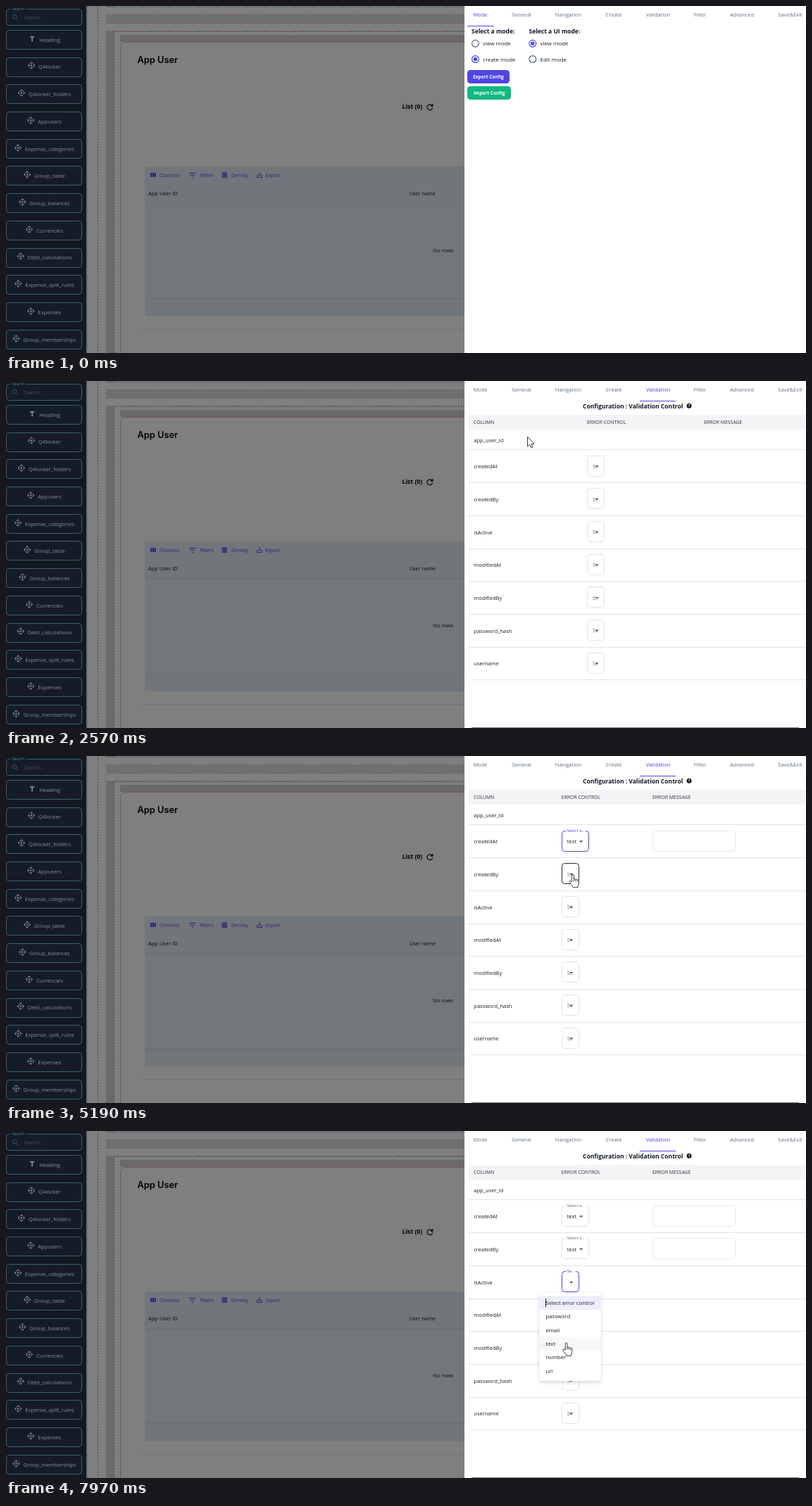
Recreate the animation shown at these times as an HTML page. Size 1136x493 px, loop 8 s.

```html
<!DOCTYPE html>
<html lang="en">
<head>
<meta charset="utf-8">
<title>Validation settings</title>
<style>
html, body { margin: 0; width: 100%; height: 100%; overflow: hidden; background: #fff; }
svg { display: block; width: 100%; height: 100%; font-family: "Open Sans", "Noto Sans", sans-serif; }
text { white-space: pre; }
</style>
</head>
<body>
<svg id="stage" viewBox="0 0 1136 493" xmlns="http://www.w3.org/2000/svg">
  <defs>
    <filter id="soft" x="-20%" y="-20%" width="140%" height="140%">
      <feDropShadow dx="0" dy="2" stdDeviation="2.5" flood-color="#1e293b" flood-opacity=".2"/>
    </filter>
  </defs>
  <g id="back"></g>
  <g id="panel"></g>
  <g id="tabs"></g>
  <rect id="ink" y="28" height="1" fill="#4f46e5"/>
  <g id="menu"></g>
  <g id="pointer" stroke="#222" stroke-width=".9" stroke-linejoin="round" fill="#fff">
    <path id="arrow" d="M.5 .5V14L3.7 11.1 5.9 15.7 8 14.8 6 10.3H10.2Z"/>
    <path id="hand" d="M4.2 10.8V1.9a1.4 1.4 0 0 1 2.8 0V7.2a1.3 1.3 0 0 1 2.4.4 1.3 1.3 0 0 1 2.3.6 1.2 1.2 0 0 1 2.1 1V13c0 2-1.2 3-1.4 5.8H5.8C5.6 16.6 2.4 14.2.8 11.4.1 9.7 1.7 9 2.7 9.8ZM7 7.2V10M9.4 7.8V10M11.7 8.5V10.4"/>
  </g>
</svg>
<script>
const LOOP = 8000, EDGE = 651, VIOLET = "#4f46e5", INK = "#17202d", INDIGO = "#282478";
const $ = id => document.getElementById(id);
const crisp = v => Math.floor(v) + .5;

const text = (x, y, s, size, fill = INK, more = "") =>
  `<text x="${x}" y="${Math.round(y)}" font-size="${size}" fill="${fill}" ${more}>${s}</text>`;
const box = (x, y, w, h, fill, more = "") =>
  `<rect x="${x}" y="${y}" width="${w}" height="${h}" fill="${fill}" ${more}/>`;
const line = (d, stroke, more = "") =>
  `<path d="${d}" fill="none" stroke="${stroke}" ${more}/>`;
const BOLD = 'font-weight="700"', MID = 'text-anchor="middle"';

// ---- dimmed page behind the drawer
function page() {
  const red = "#7c4d45", blue = "#3f4866", dash = 'stroke-dasharray="2 2"';
  const across = (x, y) => `M${x} ${y}H${EDGE}`;
  let s = box(0, 0, EDGE, 493, "#7f7f7f") + box(114, 0, 2, 493, "#6e6e6e");
  s += line("M130.500 0V493", "#444", dash);
  s += box(142, 0, 12, 2, "#6a6a6a") + box(142, 13, EDGE - 142, 11, "#6f6f6f") + box(142, 36, 11, 457, "#6a6a6a");
  s += line(across(154, 1.5), blue, dash) + line(across(142, 12.5) + across(142, 24.5) + across(142, 35.5), red, dash);
  s += line("M153.500 493V36.500" + across(153.5, 36.5), blue, dash);
  s += box(162, 41, EDGE - 162, 10, "#6a6a6a");
  s += line(`M162.500 493V60Q162.500 51.500 171 51.500H${EDGE}`, "#7b5650");
  s += text(186.5, 81, "App User", 12.8, "#000", 'font-family="Inter, sans-serif" font-weight="600"');
  s += text(562.5, 146, "List (0)", 8.7, "#000", BOLD);
  s += line("M605 141.300A3.900 3.900 0 1 0 605.800 144.500", "#000", 'stroke-width="1.200"');
  s += `<path d="M606.500 138.500V142.700H602.300Z"/>`;

  s += box(197, 228, 454, 213, "#70767a", 'rx="3"') + box(197, 281, 454, 134, "#73777a");
  s += line(across(197, 280.5) + across(197, 415.5), "#696d70") + line("M567.500 262V270", "#646a70");
  s += line(across(192, 459.5), "#747474");
  for (const [x, label] of [[218, "Columns"], [275.5, "Filters"], [320, "Density"], [368.5, "Export"]])
    s += text(x, 243, label, 6.85, INDIGO, 'font-weight="500"');
  for (let i = 0; i < 3; i++) s += box(205 + i * 2.8, 237, 2.2, 6, INDIGO);
  s += line("M260 237.500H269.500M262 240.500H267.500M264 243.500H265.800", INDIGO);
  for (let i = 0; i < 4; i++) s += box(306.5, 236.5 + i * 2, 7.5, 1.4, INDIGO);
  s += line("M356.500 240V243.500H363.500V240M360 236V241M358 239.300L360 241.300 362 239.300", INDIGO);
  s += text(202, 269, "App User ID", 7.5, "#0c0c0c") + text(572.5, 269, "User name", 7.35, "#0c0c0c");
  s += text(606, 350, "No rows", 7.6, "#0c0c0c");
  return s;
}

function sidebar() {
  const bg = "#131822", teal = "#35666a", pale = "#898e96";
  const names = ["Heading", "Q4locker", "Q4locker_folders", "Appusers", "Expense_categories", "Group_table",
    "Group_balances", "Currencies", "Debt_calculations", "Expense_split_rules", "Expenses", "Group_memberships"];
  let s = box(0, 0, 114, 493, bg);
  const frame = (y, h) => box(.5, y, 107, h, "#161c27", `rx="4" stroke="${teal}"`);
  s += frame(4.5, 23) + box(6.5, 3, 22, 4, bg) + text(8.5, 6, "Search", 5.7, "#4d9193");
  s += `<circle cx="12.300" cy="15.300" r="2.900" fill="none" stroke="#4a505a"/>` + line("M14.500 17.500L17.500 20.500", "#4a505a");
  s += text(26, 19, "Search...", 7.1, "#4a505a");
  names.forEach((n, i) => {
    const y = 47.8 + i * 38.73;
    s += frame(Math.round(y - 14) + .5, 27) + text(62, y + 2.8, n, 7.65, pale, MID + ' class="item"');
  });
  return s;
}

// Icons sit just left of each centred label.
function icons() {
  let s = "";
  document.querySelectorAll(".item").forEach((el, i) => {
    const x = 62 - el.getComputedTextLength() / 2 - 10, y = +el.getAttribute("y") - 4.5;
    let d = "M-3 -2.600H3M0 -2.600V4";
    if (i) {
      d = "";
      for (const [a, b] of [[0, -1], [1, 0], [0, 1], [-1, 0]])
        d += `M${a * 2.6 - b * 1.8} ${b * 2.6 + a * 1.8}L${a * 4.4} ${b * 4.4} ${a * 2.6 + b * 1.8} ${b * 2.6 - a * 1.8}`;
    }
    s += `<g transform="translate(${x} ${y})">` + line(d, "#898e96", `stroke-width="${i ? 1.1 : 1.7}"`) +
      (i ? '<circle r="1.200" fill="#898e96"/>' : "") + "</g>";
  });
  return s;
}

// ---- drawer
const TABS = [["Mode", 673.5], ["General", 732], ["Navigation", 798.5], ["Create", 863],
  ["Validation", 926], ["Filter", 985.5], ["Advanced", 1045], ["Save&amp;Exit", 1113.5]];
const tabs = on => TABS.map(([n, x], i) =>
  text(x, 15, n, 7.5, i === on ? VIOLET : "#607086", MID)).join("");

function modePanel() {
  const radio = (x, y, label, on) =>
    `<circle cx="${x}" cy="${y}" r="4.900" fill="none" stroke="${on ? VIOLET : "#56657b"}" stroke-width="1.200"/>` +
    (on ? `<circle cx="${x}" cy="${y}" r="2.700" fill="${VIOLET}"/>` : "") + text(x + 10.7, y + 3, label, 7.9);
  const button = (y, w, label, fill) => box(655, y, w, 19, fill, 'rx="4.500"') +
    text(655 + w / 2, y + 12, label, 6.5, "#fff", BOLD + " " + MID);
  return text(661, 39, "Select a mode:", 8.5, "#111827", BOLD) +
    text(742.5, 39, "Select a UI mode:", 8.5, "#111827", BOLD) +
    radio(666.5, 53.3, "view mode") + radio(666.5, 75.5, "create mode", true) +
    radio(747.8, 53.3, "view mode", true) + radio(747.8, 75.5, "Edit mode") +
    button(91, 60, "Export Config", VIOLET) + button(114, 62, "Import Config", "#10b981");
}

const ROWS = ["app_user_id", "createdAt", "createdBy", "isActive", "modifiedAt", "modifiedBy", "password_hash", "username"];
const OPTIONS = ["Select error control", "password", "email", "text", "number", "url"];
const rowY = i => i ? 121.3 + (i - 1) * 46.67 : 84;

function selectBox(x, y, s) {
  const w = s.filled ? 38 : 24, raised = s.filled || s.open, top = crisp(y - 15);
  const edge = s.focus ? VIOLET : s.hover ? "#222a36" : "#e0e3e8";
  const label = s.filled ? "Select e.." : "Se..", ax = x + w - 10.3, dir = s.open ? -1 : 1;
  let out = box(crisp(x), top, w, 29, "#fff", `rx="4" stroke="${edge}"`);
  if (raised)
    out += box(x + 6.5, top - 1, s.filled ? 27 : 13, 2, "#fff") +
      text(x + 7.7, top + 1.6, label, 5.8, s.focus ? VIOLET : "#56657b");
  if (s.filled) out += text(x + 7.7, y + 3, "text", 7.5);
  else if (!s.open) out += text(x + 7.7, y + 2.6, "S..", 7.5, "#64748b");
  return out + `<path d="M${ax - 2.7} ${y - dir * 1.1}h5.400l-2.700 ${dir * 2.7}Z" fill="#4b5563"/>`;
}

function validationPanel(s) {
  const x = s.filled ? 789 : 825.3, mx = s.filled ? 918 : 991;
  let out = text(819, 39, "Configuration : Validation Control", 8.5, "#111827", BOLD);
  out += `<circle cx="970" cy="35.300" r="3.500" fill="#111827"/>` + text(970, 37, "?", 5.6, "#fff", BOLD + " " + MID);
  out += box(656, 48, 490, 21, "#f4f4f6", 'rx="3"');
  [[664, "COLUMN"], [x - .3, "ERROR CONTROL"], [mx, "ERROR MESSAGE"]].forEach(([a, n]) =>
    out += text(a, 61, n, 6.9, "#2b3441", 'font-weight="500"'));
  ROWS.forEach((n, i) => {
    const y = rowY(i), end = i ? Math.round(y + 23) + .5 : 97.5;
    out += line(`M${i === 7 ? 660 : 656} ${end}H1136`, "#e1e3e8") + text(664.3, y + 2.9, n, 7.5);
    if (!i) return;
    const filled = i <= s.filled;
    out += selectBox(x, y, { filled, open: s.open === i, focus: s.focus === i, hover: s.hover === i });
    if (filled) out += box(918.5, crisp(y - 15), 117, 29, "#fff", 'rx="4" stroke="#e6e8ec"');
  });
  return out + box(661, 492, 465, 1, "#777");
}

function menuBox(s) {
  if (!s.open) return "";
  const x = s.filled ? 757.5 : 794, top = rowY(s.open) + 14.9;
  let out = box(x, top, 87, 125.5, "#fff", 'rx="3.500" filter="url(#soft)"');
  OPTIONS.forEach((n, i) => {
    const y = top + 5 + i * 19.3;
    if (!i || s.pick === i) out += box(x, y, 87, 19.3, i ? "#f6f7f8" : "#ededfb");
    out += text(x + 9, y + 12.5, n, 7.7);
  });
  if (s.open === 3) out += line(`M${x + 9} ${top + 8.5}v12`, "#222");
  return out;
}

// ---- timeline: [ms, x, y, hand]
const PATH = [
  [0, 712, -25, 0], [70, 711, -14, 0], [380, 705, 82, 1], [440, 703, 85, 1], [670, 703, 84, 1],
  [780, 715, 78, 0], [1250, 838, 28, 1], [1390, 852, 20, 1], [1480, 862, 18, 1], [1630, 862, 18, 1],
  [2100, 918, 5, 1], [2250, 918, 5, 1], [2330, 905, 20, 0], [2570, 740, 79, 0], [2700, 740, 79, 0],
  [2980, 940, 30, 0], [3110, 938, 32, 0], [3370, 833, 114, 1], [3560, 832, 120, 1], [3910, 829, 193, 1],
  [3980, 828, 194, 1], [4400, 829, 213, 1], [4670, 829, 213, 1], [4700, 828, 212, 0], [5070, 800, 167, 1],
  [5190, 799.5, 168, 1], [5530, 799.5, 170, 1], [6150, 795, 254, 1], [6290, 795, 254, 1], [6330, 795, 250, 0],
  [6680, 798, 211, 1], [6820, 798, 215, 1], [6960, 798, 236, 1], [7150, 798, 240, 1], [7900, 792, 298, 1],
  [7970, 790, 300.5, 1], [LOOP, 790, 300.5, 1]
];
const SWITCH = 2250, FADE = 130;
const OPENS = [[3510, 4680], [5300, 6290], [6820, LOOP + 1]];

function cursorAt(t) {
  let i = 0;
  while (i < PATH.length - 2 && t >= PATH[i + 1][0]) i++;
  const a = PATH[i], b = PATH[i + 1], k = (t - a[0]) / (b[0] - a[0]);
  return { x: a[1] + (b[1] - a[1]) * k, y: a[2] + (b[2] - a[2]) * k, hand: a[3] };
}

function stateAt(t, c) {
  const s = { filled: 0, open: 0, focus: 0, hover: 0, pick: -1, fade: 1 };
  OPENS.forEach(([from, to], i) => {
    if (t >= from) s.focus = i + 1;
    if (t >= to) s.filled = i + 1;
    else if (t >= from) { s.open = i + 1; s.fade = Math.min(1, (t - from) / FADE); }
  });
  const tipX = c.x + (c.hand ? 5.6 : 0), left = s.filled ? 789 : 825;
  if (s.open) s.pick = Math.floor((c.y - rowY(s.open) - 19.9) / 19.3);
  else if (tipX > left && tipX < left + 25)
    for (let i = 1; i < 8; i++) if (Math.abs(c.y - rowY(i)) < 15) s.hover = i;
  return s;
}

const shown = {};
function put(id, html) {
  if (shown[id] !== html) $(id).innerHTML = shown[id] = html;
}

function draw(t) {
  const c = cursorAt(t), s = stateAt(t, c), late = t >= SWITCH;
  put("tabs", tabs(late ? 4 : 0));
  put("panel", box(EDGE, 0, 1136 - EDGE, 493, "#fff") + (late ? validationPanel(s) : modePanel()));
  put("menu", late ? menuBox(s) : "");
  $("menu").setAttribute("opacity", s.fade);
  const p = Math.max(0, Math.min(1, (t - SWITCH) / 280)), k = 1 - (1 - p) ** 3;
  $("ink").setAttribute("x", 655 + 245 * k);
  $("ink").setAttribute("width", 38 + 13 * k);
  $("pointer").setAttribute("transform", `translate(${c.x} ${c.y})`);
  $("arrow").setAttribute("display", c.hand ? "none" : "inline");
  $("hand").setAttribute("display", c.hand ? "inline" : "none");
}

$("back").innerHTML = page() + sidebar();
$("back").insertAdjacentHTML("beforeend", icons());
const start = performance.now();
function tick() {
  draw((performance.now() - start) % LOOP);
  requestAnimationFrame(tick);
}
tick();
</script>
</body>
</html>
```
